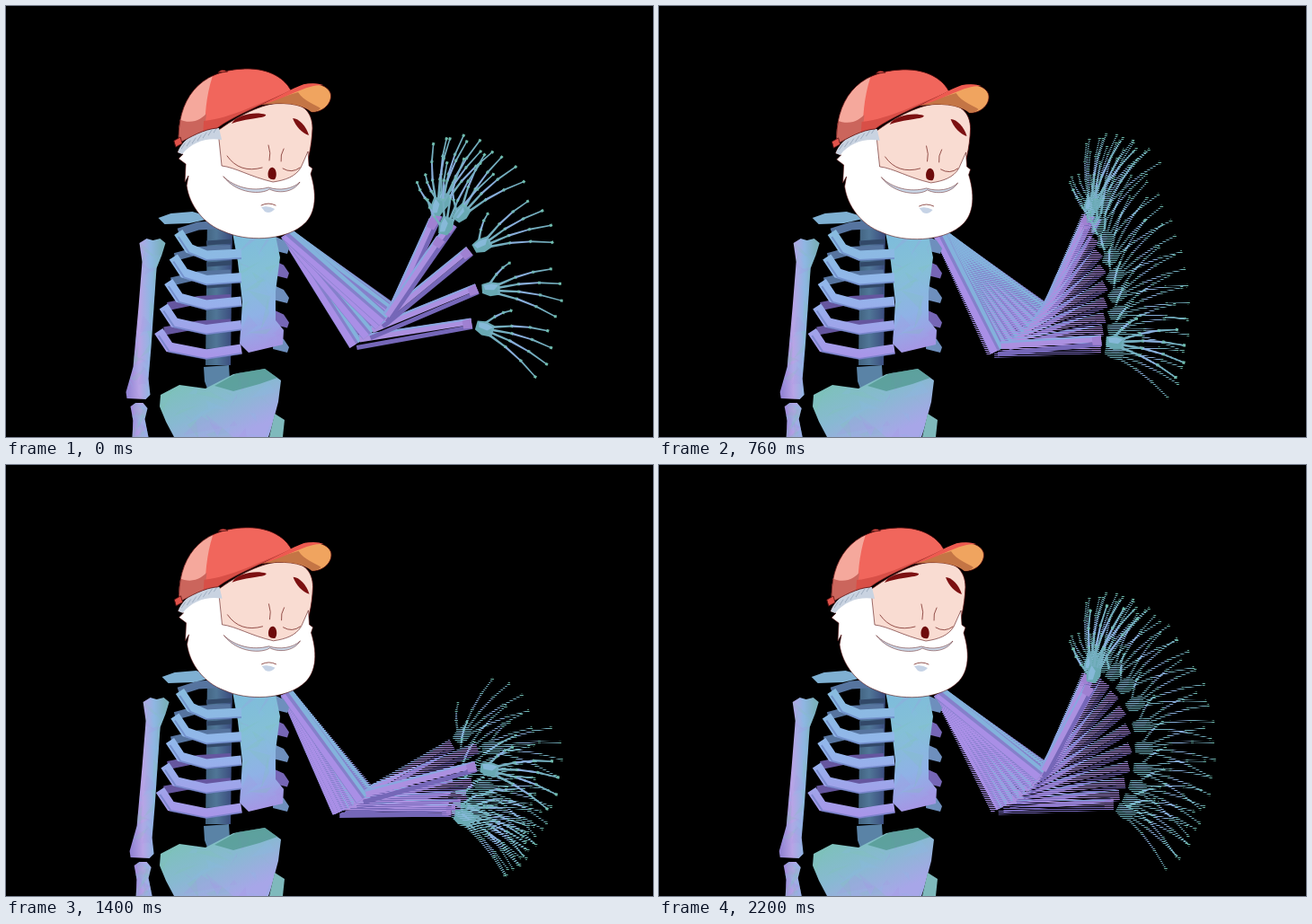
An HTML page with a canvas for the animation above (2240 ms loop, 720x480 px).

```html
<!DOCTYPE html>
<html lang="en">
<head>
<meta charset="utf-8">
<title>Waving skeleton</title>
<style>
html, body { margin: 0; width: 100%; height: 100%; overflow: hidden; background: #000; }
canvas { display: block; }
</style>
</head>
<body>
<canvas id="stage" width="720" height="480"></canvas>
<script>
const LOOP = 2240, STEP = 40, STROBES = 13, TRAIL = 7, TAU = Math.PI * 2;
const stage = document.getElementById('stage').getContext('2d');
const layer = document.createElement('canvas').getContext('2d');
layer.canvas.width = 720;
layer.canvas.height = 480;

const rad = deg => deg * Math.PI / 180;

function seeded(seed) {
  return () => (seed = seed * 16807 % 2147483647) / 2147483647;
}

function trace(g, p) {
  g.beginPath();
  for (let i = 0; i < p.length; i += 2) g.lineTo(p[i], p[i + 1]);
}

function poly(g, color, ...p) {
  trace(g, p);
  g.fillStyle = color;
  g.fill();
}

function line(g, color, width, ...p) {
  trace(g, p);
  g.strokeStyle = color;
  g.lineWidth = width;
  g.stroke();
}

function shape(g, d, fill, stroke, width = .8) {
  const p = new Path2D(d);
  if (fill) { g.fillStyle = fill; g.fill(p); }
  if (stroke) { g.strokeStyle = stroke; g.lineWidth = width; g.stroke(p); }
}

function shade(x0, y0, x1, y1, ...colors) {
  const s = stage.createLinearGradient(x0, y0, x1, y1);
  colors.forEach((c, i) => s.addColorStop(i / (colors.length - 1), c));
  return s;
}

// polygon with soft low-poly facets
function facets(fill, ...p) {
  const xs = p.filter((_, i) => i % 2 === 0), ys = p.filter((_, i) => i % 2);
  const left = Math.min(...xs), top = Math.min(...ys);
  const w = Math.max(...xs) - left, h = Math.max(...ys) - top;
  const rnd = seeded(p[0] * 31 + p.length), tints = ['#7cc4b0', '#86b8e4', '#a58fe0'];
  stage.save();
  poly(stage, fill, ...p);
  stage.clip();
  stage.globalAlpha = .2;
  for (let i = 0; i < 36; i++) {
    const x = left + rnd() * w, y = top + rnd() * h;
    const near = () => (rnd() - .5) * 46;
    poly(stage, tints[i % 3], x, y, x + near(), y + near(), x + near(), y + near());
  }
  stage.restore();
}

// tapered bone, shifted sideways
function bone(g, color, x0, y0, x1, y1, w0, w1, shift = 0) {
  const d = Math.hypot(x1 - x0, y1 - y0), nx = (y0 - y1) / d, ny = (x1 - x0) / d;
  const at = (x, y, o) => [x + nx * o, y + ny * o];
  poly(g, color, ...at(x0, y0, shift - w0 / 2), ...at(x1, y1, shift - w1 / 2),
    ...at(x1, y1, shift + w1 / 2), ...at(x0, y0, shift + w0 / 2));
}

function hand(g, x, y, angle) {
  g.save();
  g.translate(x, y);
  g.rotate(angle);
  poly(g, '#69a9b3', 5, -5, 14, -8, 25, -7, 26, 6, 15, 8, 6, 5);
  poly(g, '#86b9d8', 7, -4, 15, -6, 24, -5, 19, 1, 9, 1);
  for (let i = 0; i < 5; i++) {
    const thumb = i === 0, len = thumb ? 46 : 95 - 2.5 * (i - 3) ** 2;
    const a = rad(thumb ? -40 : 11.5 * i - 28);
    const sx = thumb ? 14 : 23, sy = thumb ? -6 : i * 3.2 - 8;
    let px = sx, py = sy;
    for (let j = 1; j < 4; j++) {
      const f = j / 3;
      const qx = sx + (len * Math.cos(a) - sx) * f;
      const qy = sy + (len * Math.sin(a) - sy) * f - 3 * Math.sin(f * Math.PI);
      bone(g, j === 2 ? '#88aedb' : '#74aebf', px, py, qx, qy, 3.2 - j * .4, 2.4 - j * .3);
      g.fillStyle = '#6fbcae';
      g.fillRect(qx - 1.5, qy - 1.5, 3, 3);
      px = qx;
      py = qy;
    }
  }
  g.restore();
}

// the hand lags behind the forearm, the forearm behind the upper arm
function arm(g, strobe) {
  const swing = lowest => Math.cos(TAU * (strobe - lowest) / STROBES);
  const upper = rad(51 + 15 * swing(4.7));
  const fore = rad(-27 + 33 * swing(5) - 6 * swing(5) ** 2);
  const reach = 120 + 11 * swing(7.5);
  const ex = 312 + 145 * Math.cos(upper), ey = 254 + 145 * Math.sin(upper);
  const wx = ex + reach * Math.cos(fore), wy = ey + reach * Math.sin(fore);
  bone(g, '#8580cb', 312, 254, ex, ey, 14, 17);
  bone(g, '#a98fe6', 312, 254, ex, ey, 5, 8, 4);
  bone(g, '#83b2dc', 311, 253, ex, ey, 5, 4, -5);
  bone(g, '#7567b8', ex, ey, wx, wy, 5, 5, 4);
  bone(g, '#ab90e0', ex + 4, ey - 4, wx, wy, 8, 7, -2);
  bone(g, '#8aa6e0', ex + 4, ey - 4, wx, wy, 2.5, 2, -5);
  bone(g, '#a081d2', wx - 10 * Math.cos(fore), wy - 10 * Math.sin(fore), wx, wy, 9, 11);
  hand(g, wx, wy, rad(-20 + 54 * swing(5.6)));
}

function trail(g, lead) {
  for (let n = TRAIL - 1; n >= 0; n--) arm(g, lead - n);
}

// pulldown cadence: three clean pictures, then two woven from two fields
function arms(t) {
  const phase = Math.floor(t / LOOP * STROBES * 2);
  const index = Math.max(0, t / STEP - 1);
  if (index % 5 < 3) return trail(stage, Math.floor(phase / 2));
  const leads = [phase / 2, (phase - 1) / 2].sort((a, b) => a % 1 - b % 1);
  leads.forEach((lead, field) => {
    layer.clearRect(0, 0, 720, 480);
    trail(layer, lead);
    for (let y = field; y < 480; y += 2) layer.clearRect(0, y, 720, 1);
    stage.drawImage(layer.canvas, 0, 0);
  });
  arm(stage, leads[1]);
}

function ribs(sway) {
  const g = stage, near = shade(0, 240, 0, 395, '#86bcdc', '#93b6ec', '#a994e8');
  for (let i = 0; i < 5; i++) {
    const y = 252 + 27.5 * i, low = i > 2;
    line(g, low ? '#65569f' : '#56749f', 9, 192 - 4 * i, y, 214, y - 7, 250, y - 9);
    poly(g, i % 2 ? '#7666b6' : '#6e8fbd', 298, y + 4, 309, y + 9, 315, y + 18, 313, y + 24, 297, y + 20);
  }
  facets(shade(255, 255, 300, 385, '#7ebcdc', '#84c0d6', '#8fb2e6', '#a991e4'),
    252, 252, 300, 256, 305, 280, 300, 318, 300, 350, 309, 361, 308, 377, 270, 386, 260, 376, 263, 330, 258, 285);
  for (let i = 0; i < 5; i++) {
    const y = 252 + 27.5 * i, x = 192 - 5.5 * i + sway;
    const bend = [x, y, x + 12, y + 18, 223, y + 26, 262, y + 24 - i];
    line(g, near, 11, ...bend);
    line(g, '#5f74b888', 2, ...bend.map((v, k) => k % 2 ? v + 5 : v));
  }
}

function torso(sway) {
  const g = stage;
  poly(g, shade(218, 0, 250, 0, '#3d5c78', '#507697', '#3c4f80'), 224, 235, 252, 240, 250, 400, 222, 400);
  for (let y = 262; y < 400; y += 24) line(g, '#324868', 5, 223, y + 2, 251, y);
  poly(g, '#5a83a6', 220, 402, 248, 400, 249, 416, 245, 424, 224, 426, 221, 418);
  ribs(sway * .4);
  // pelvis
  facets(shade(220, 405, 255, 480, '#7cc2b8', '#88b9d2', '#a7a6e8'),
    172, 433, 193, 422, 222, 426, 253, 410, 288, 404, 306, 417, 303, 441, 295, 471, 292, 480, 187, 480, 178, 463, 171, 446);
  poly(g, '#4f988ebb', 232, 423, 257, 409, 288, 404, 302, 414, 282, 421, 253, 429);
  poly(g, '#7fb9bc', 299, 454, 310, 461, 308, 480, 293, 480);
  // left arm
  g.save();
  g.translate(sway, 0);
  poly(g, '#7fb0d2', 170, 236, 184, 231, 208, 229, 231, 236, 205, 242, 177, 243);
  const limb = shade(136, 0, 174, 0, '#9384d4', '#b8a4e6', '#8fb6e2', '#7bb0bc');
  facets(limb, 149, 264, 157, 259, 164, 261, 172, 259, 178, 264, 174, 277, 168, 292,
    162, 380, 159, 415, 161, 433, 156, 438, 135, 437, 134, 430, 142, 402, 148, 335, 152, 285);
  facets(limb, 139, 446, 145, 442, 153, 442, 158, 448, 155, 460, 159, 480, 141, 480, 142, 462);
  g.restore();
}

function head(x, y) {
  const g = stage, ink = '#5a1212';
  g.save();
  g.translate(x, y);
  g.lineJoin = g.lineCap = 'round';
  // face and beard
  shape(g, 'M234 140C258 122 286 108 306 108C330 106 341 118 341 136C340 158 336 176 328 190L300 200L238 184Z', '#f9dcd2', ink);
  shape(g, 'M236 140L240 178C256 180 271 190 297 196C311 194 322 190 328 180L336 162L337 178L341 181L339 187C347 213 344 234 329 245C309 261 268 263 242 251C220 243 204 222 201 200L203 189L199 196L200 176L192 170L197 165L191 163C197 147 214 138 236 136Z', '#fff', ink, .6);
  shape(g, 'M191 163C198 146 216 136 237 136L240 149C224 146 207 151 196 165Z', '#c9d3e1');
  for (let i = 0; i < 7; i++) line(g, '#8496ac', .6, 195 + i * 6, 159 - i * 3, 199 + i * 6, 153 - i * 3);
  shape(g, 'M242 190C257 210 285 210 293 204C306 210 321 206 327 196C319 204 304 206 292 202C274 207 254 202 242 190Z', '#cbd8e8', ink, .5);
  shape(g, 'M284 224Q292 222 299 226Q294 232 288 229Z', '#c6d3e6');
  // features
  shape(g, 'M251 131C256 121 278 117 289 121C291 125 266 125 251 131Z', '#7c1011');
  shape(g, 'M319 125C326 125 334 134 337 144C330 142 322 134 319 125Z', '#7c1011');
  shape(g, 'M246 167Q260 187 285 180M308 181Q318 187 327 180M292 155Q295 164 293 172M309 159Q305 166 306 173M284 222Q292 218 300 222', null, '#7a2d28');
  shape(g, 'M292 191C290 184 294 179 297 180C301 181 302 190 299 193Q295 194 292 191Z', '#6e0b0b');
  // cap
  const crown = 'M192 153C190 105 214 71 266 70C294 69 311 82 317 94C284 111 254 122 235 136C220 137 205 146 192 153Z';
  g.save();
  g.clip(new Path2D(crown));
  shape(g, crown, '#f1665c');
  shape(g, 'M190 155L193 105L232 72Q221 100 221 142Z', '#f5a89c');
  shape(g, 'M190 125C207 134 218 125 223 120L220 144L190 155Z', '#cb655c');
  shape(g, 'M220 128C250 125 284 107 318 94L235 139L219 143Z', '#d84f47');
  g.restore();
  shape(g, crown, null, ink);
  shape(g, 'M236 74Q240 69 246 73ZM187 150L194 146L196 153L189 157Z', '#e0524a', ink);
  shape(g, 'M285 110C301 104 316 94 330 88C346 84 358 89 361 97C364 108 352 119 340 118C327 108 308 107 285 110Z', '#f0a45f', ink);
  shape(g, 'M285 110C302 103 314 99 325 96C331 106 345 110 350 114Q346 118 340 118C327 108 308 107 285 110Z', '#c47545');
  shape(g, 'M281 111C301 103 316 92 332 87Q345 85 353 88C331 88 318 101 281 111Z', '#ed5a50');
  g.restore();
}

function draw(now) {
  const t = Math.floor(now % LOOP / STEP) * STEP;
  const nod = t < 1560 ? Math.sin(Math.PI * (t + 60) / 1620) ** 2 : 0;
  stage.fillStyle = '#000';
  stage.fillRect(0, 0, 720, 480);
  arms(t);
  torso(1.2 + 2.4 * Math.cos(TAU * (t - 1400) / LOOP));
  head(5.6 * nod, 2 * nod * Math.sin(TAU * t / 1800));
}

const start = performance.now();
function tick() {
  draw(performance.now() - start);
  requestAnimationFrame(tick);
}
tick();
</script>
</body>
</html>
```
